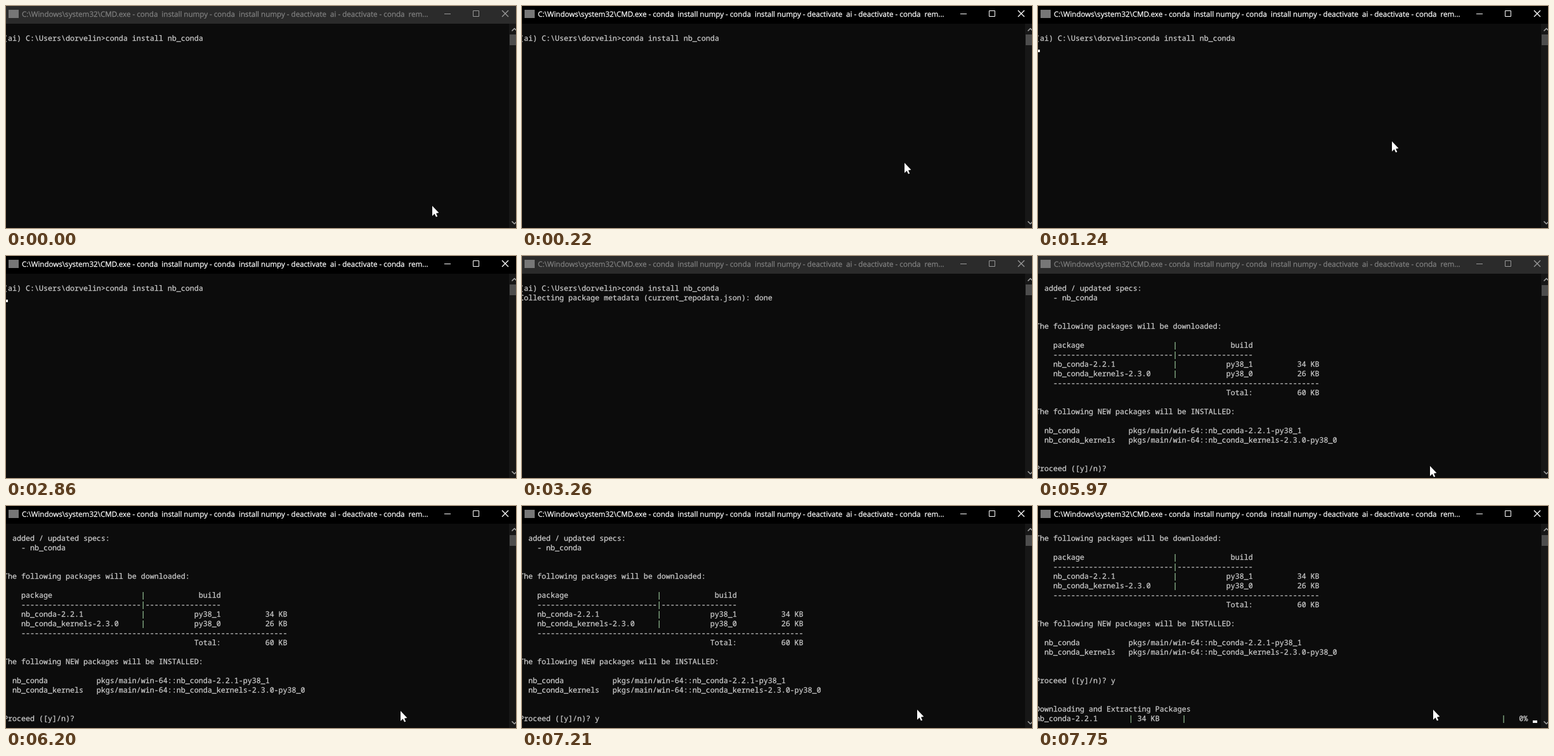
These frames come from a looping animation (804 by 351 pixels, 8 s). An HTML page:

```html
<!DOCTYPE html>
<html lang="en">
<head>
<meta charset="utf-8">
<title>Console install</title>
<style>
html, body { margin: 0; width: 100%; height: 100%; overflow: hidden; background: #0c0c0c; }
svg { display: block; }
text { white-space: pre; text-rendering: geometricPrecision; stroke-width: .25; }
#title { font: 11.6px "Open Sans", "Noto Sans", sans-serif; }
#screen { font: 11.667px "Noto Sans Mono", "DejaVu Sans Mono", monospace; fill: #ccc; stroke: #ccc; }
.pipe { fill: #9ccb9c; stroke: #9ccb9c; }
</style>
</head>
<body>
<svg width="804" height="351" viewBox="0 0 804 351">
  <rect width="804" height="351" fill="#0c0c0c"/>
  <g id="screen"></g>
  <rect id="caret" width="7" height="4" fill="#f2f2f2"/>
  <rect x="793" y="28" width="11" height="323" fill="#171717"/>
  <rect id="thumb" x="794" width="10" height="17" fill="#4d4d4d"/>
  <path d="M797.5 39.5l4-4 4 4M797.5 340.5l4 4 4-4" fill="none" stroke="#aaa" stroke-width="1.5"/>
  <rect id="bar" width="804" height="28"/>
  <rect x="4" y="6" width="16" height="13" fill="#777"/>
  <text id="title" x="25" y="17">C:\Windows\system32\CMD.exe - conda  install numpy - conda  install numpy - deactivate  ai - deactivate - conda  rem...</text>
  <g id="buttons" fill="none">
    <path d="M691 12.5h10M736.5 7.5h9v9h-9z"/>
    <path d="M782 7l10 10M792 7l-10 10" stroke-width="1.4"/>
  </g>
  <path id="mouse" d="M0 0V16L3.6 12.6 6 17.6 8.2 16.7 6 11.8 10.4 11Z" fill="#fff"/>
</svg>
<script>
const LOOP = 8000, CELL = 7, ROW = 15, LEFT = -4, TOP = 43, BLINK = 530, SPIN = 135;
const FOCUS = 190, ENTER = 930, BLUR = 3260, SOLVE = 3330, PLAN = 4490;
const REFOCUS = 6130, ANSWER = 6890, FETCH = 7670, BAR = 7750;
const $ = id => document.getElementById(id);
const set = (id, attrs) => Object.entries(attrs).forEach(([k, v]) => $(id).setAttribute(k, v));

// Places pieces of text at given columns: column, text, column, text, ...
const cols = (...parts) => {
  let line = '';
  for (let i = 0; i < parts.length; i += 2) line = line.padEnd(parts[i]) + parts[i + 1];
  return line;
};
const pkg = (name, build, size) => cols(4, name, 31, '|', 43, build, 59, size);
const source = (name, build) => cols(2, name, 21, `pkgs/main/win-64::${name}-${build}`);

const command = '(ai) C:\\Users\\dorvelin>conda install nb_conda';
const collecting = 'Collecting package metadata (current_repodata.json): done';
const plan = [
  '  added / updated specs:',
  '    - nb_conda',
  '', '',
  'The following packages will be downloaded:',
  '',
  cols(4, 'package', 31, '|', 44, 'build'),
  cols(4, '-'.repeat(27) + '|' + '-'.repeat(17)),
  pkg('nb_conda-2.2.1', 'py38_1', '34 KB'),
  pkg('nb_conda_kernels-2.3.0', 'py38_0', '26 KB'),
  cols(4, '-'.repeat(60)),
  cols(43, 'Total:', 59, '60 KB'),
  '',
  'The following NEW packages will be INSTALLED:',
  '',
  source('nb_conda', '2.2.1-py38_1'),
  source('nb_conda_kernels', '2.3.0-py38_0'),
  '', '',
  'Proceed ([y]/n)? '
];
const answered = [...plan.slice(0, -1), plan.at(-1) + 'y'];
const progress = cols(0, 'nb_conda-2.2.1', 21, '| 34 KB', 33, '|', 105, '|   0% ');

function linesAt(t) {
  if (t < ENTER) return [command];
  if (t < BLUR) return [command, ''];
  if (t < SOLVE) return [command, collecting];
  if (t < PLAN) {
    const spinner = '/-\\|'[Math.floor((t - SOLVE) / SPIN) % 4];
    return [command, collecting, 'Solving environment: ' + spinner];
  }
  if (t < ANSWER) return plan;
  if (t < FETCH) return answered;
  return [...answered.slice(4), '', '', 'Downloading and Extracting Packages', t < BAR ? '' : progress];
}

// Start of the current focus, or null while the window is in the background
function focusStart(t) {
  if (t >= REFOCUS) return REFOCUS;
  return t >= FOCUS && t < BLUR ? FOCUS : null;
}

const clamp = x => Math.min(1, Math.max(0, x));
const easeOut = k => 1 - (1 - k) ** 2;
const mix = (a, b, k) => a.map((v, i) => v + (b[i] - v) * k);

function glide(t, from, to, a, b, bend = mix(a, b, .5)) {
  const k = easeOut(clamp((t - from) / (to - from)));
  return mix(mix(a, bend, k), mix(bend, b, k), k);
}

function pointerAt(t) {
  const rest = [547, 192], nudge = [559, 214];
  if (t < 780) return glide(t, 70, 530, [672, 316], rest);
  if (t < 1240) return glide(t, 780, 1160, rest, nudge);
  if (t < 2010) return glide(t, 1240, 1930, nudge, [692, 345], [410, 240]);
  return t < 5970 ? null : glide(t, 5970, 6350, [618, 332], [623, 322]);
}

const escapeText = s => s.replace(/&/g, '&amp;').replace(/</g, '&lt;').replace(/>/g, '&gt;');
const markup = (line, row) =>
  `<text x="${LEFT}" y="${TOP + 12 + row * ROW}">` +
  escapeText(line).replace(/\|/g, '<tspan class="pipe">|</tspan>') + '</text>';

let shown = '';
function render(t) {
  const lines = linesAt(t);
  const html = lines.map(markup).join('');
  if (html !== shown) $('screen').innerHTML = shown = html;

  const focus = focusStart(t), active = focus !== null;
  const titleColor = active ? '#fff' : '#808080';
  set('bar', { fill: active ? '#000' : '#2b2b2b' });
  set('title', { fill: titleColor, stroke: titleColor });
  set('buttons', { stroke: active ? '#fff' : '#999' });
  set('thumb', { y: t < PLAN ? 45 : 46 });

  const blinkOn = active && Math.floor((t - focus) / BLINK) % 2 === 1;
  set('caret', {
    visibility: blinkOn ? 'visible' : 'hidden',
    x: LEFT + lines.at(-1).length * CELL,
    y: TOP + 11 + (lines.length - 1) * ROW
  });

  const pointer = pointerAt(t);
  set('mouse', { visibility: pointer ? 'visible' : 'hidden' });
  if (pointer) set('mouse', { transform: `translate(${pointer.map(Math.round)})` });
}

const start = performance.now();
function frame() {
  render((performance.now() - start) % LOOP);
  requestAnimationFrame(frame);
}
frame();
</script>
</body>
</html>
```
